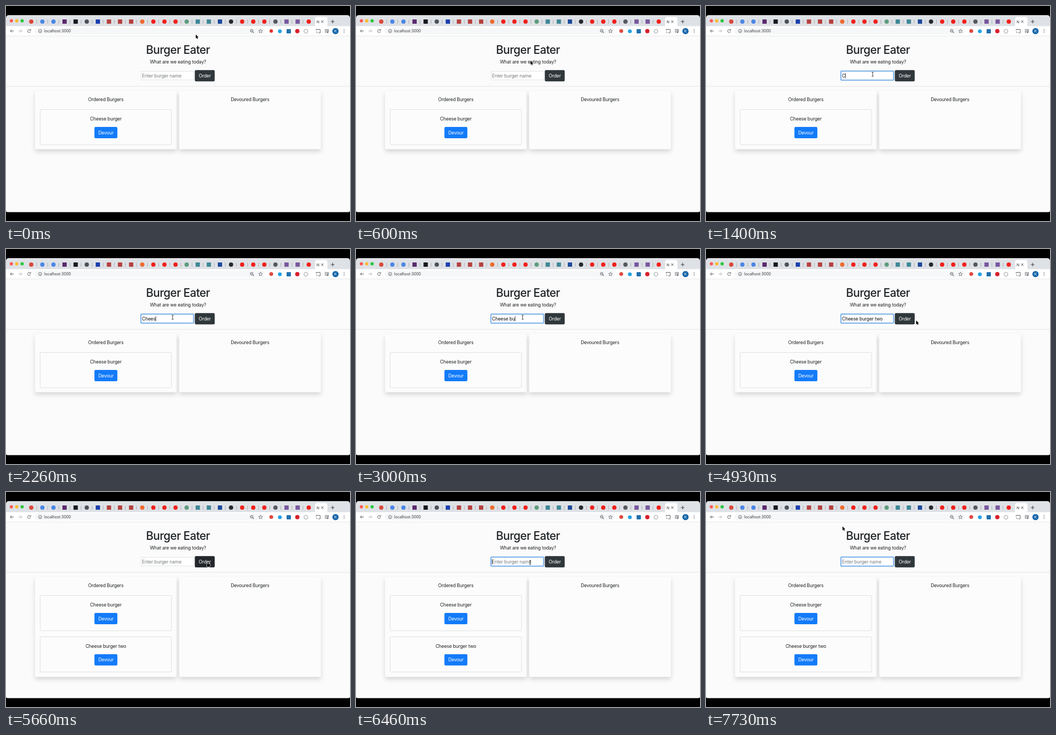
An HTML page with a canvas for the animation above (8000 ms loop, 640x400 px).

```html
<!DOCTYPE html>
<html lang="en">
<head>
<meta charset="utf-8">
<title>Burger Eater</title>
<style>
html, body { margin: 0; width: 100%; height: 100%; overflow: hidden; background: #000; }
canvas { display: block; width: 640px; height: 400px; }
</style>
</head>
<body>
<canvas id="stage" width="640" height="400"></canvas>
<script>
const ctx = document.getElementById('stage').getContext('2d');
const LOOP = 8000;
const FONT = 'Inter, Roboto, sans-serif';
const INK = '#1d2124';
const GREY = '#5f6368';

// Shape helpers
function box(x, y, w, h, fill, r = 0) {
  ctx.beginPath();
  ctx.roundRect(x, y, w, h, r);
  ctx.fillStyle = fill;
  ctx.fill();
}
function frame(x, y, w, h, color, width = 1, r = 0) {
  ctx.beginPath();
  ctx.roundRect(x, y, w, h, r);
  ctx.strokeStyle = color;
  ctx.lineWidth = width;
  ctx.stroke();
}
function dot(x, y, r, fill) {
  ctx.beginPath();
  ctx.arc(x, y, r, 0, Math.PI * 2);
  ctx.fillStyle = fill;
  ctx.fill();
}
function ring(x, y, r, color, from = 0, to = Math.PI * 2) {
  ctx.beginPath();
  ctx.arc(x, y, r, from, to);
  ctx.strokeStyle = color;
  ctx.lineWidth = 1;
  ctx.stroke();
}
function line(color, width, ...pts) {
  ctx.beginPath();
  for (let i = 0; i < pts.length; i += 2) ctx.lineTo(pts[i], pts[i + 1]);
  ctx.strokeStyle = color;
  ctx.lineWidth = width;
  ctx.stroke();
}
function text(str, x, y, { size = 8.7, weight = 400, color = INK, align = 'center', track = -0.02 } = {}) {
  ctx.font = `${weight} ${size}px ${FONT}`;
  ctx.letterSpacing = `${size * track}px`;
  ctx.textAlign = align;
  ctx.fillStyle = color;
  ctx.fillText(str, x, y);
  return ctx.measureText(str).width;
}

// Browser tabs: plain marks, 's' square or 'c' circle
const RED = 'c#f0201c', BRICK = 's#b5413f', LILAC = 's#79589f';
const TABS = [
  'c#d9483b', 'c#4a86e8', 'c#4a86e8', 's#5b2a6e', 's#17191c', 'c#4c5159', 's#1c3fae',
  BRICK, BRICK, BRICK, 'c#ee6a2c', RED, RED, RED, 'c#5d9c7c', 's#3f8796', 's#3f8796',
  's#1d4a9c', 'c#24292e', RED, RED, RED, 'c#55595e', LILAC, LILAC, RED
];
const TAB_STEP = 20.65;

function tabBar() {
  box(0, 17, 640, 24, '#dee1e5', [5, 5, 0, 0]);
  ['#fc5b57', '#fdbc2e', '#29c840'].forEach((c, i) => dot(10 + i * 10, 27.5, 3.1, c));
  TABS.forEach((tab, i) => {
    const x = 47 + i * TAB_STEP, color = tab.slice(1);
    if (tab[0] === 'c') dot(x, 29, 4, color);
    else box(x - 4, 25, 8, 8, color, 0.5);
    if (i < TABS.length - 1) line('#a0a4a9', 0.8, x + 10, 25.5, x + 10, 33);
  });
  box(575, 20.5, 23, 20, '#fff', [4, 4, 0, 0]);
  text('N', 580.5, 31.5, { size: 6.5 });
  line('#44474b', 1, 586.4, 27, 590.6, 31.2);
  line('#44474b', 1, 590.6, 27, 586.4, 31.2);
  line('#44474b', 1.1, 604.5, 29, 611, 29);
  line('#44474b', 1.1, 607.7, 25.8, 607.7, 32.2);
}

function star(x, y, r) {
  const pts = [];
  for (let i = 0; i <= 10; i++) {
    const a = i * Math.PI / 5 - Math.PI / 2, d = i % 2 ? r * 0.45 : r;
    pts.push(x + d * Math.cos(a), y + d * Math.sin(a));
  }
  line(GREY, 0.8, ...pts);
}

function toolbar(t) {
  box(0, 37.5, 640, 18.5, '#fff');
  box(53, 40, 429, 13, '#f6f7f8', 6.5);
  line(GREY, 1, 14.5, 46.5, 8, 46.5);
  line(GREY, 1, 11, 43.5, 8, 46.5, 11, 49.5);
  line('#b8bbbf', 1, 23, 46.5, 29.5, 46.5);
  line('#b8bbbf', 1, 26.5, 43.5, 29.5, 46.5, 26.5, 49.5);
  ring(43, 46.5, 2.8, GREY, 0.3, 5.4);
  line(GREY, 1, 46, 43, 46, 45.3, 43.6, 45.3);
  ring(63.5, 46.5, 3, GREY);
  line(GREY, 1, 63.5, 46, 63.5, 48.3);
  text('localhost:3000', 71, 49.2, { size: 7.2, color: '#33363a', align: 'left', track: -0.01 });

  ring(457, 46, 2.5, GREY);
  line(GREY, 1.1, 459, 48, 461.2, 50.2);
  line(GREY, 0.8, 455.8, 46, 458.2, 46);
  star(473.5, 46.7, 3.8);
  dot(493.5, 46.5, t < 600 ? 3.2 : 3.6, t < 600 ? '#e2322c' : '#df4a40');
  dot(509.5, 47, 3.6, '#24a3e5');
  box(522, 43, 8, 8, '#2472ae', 1);
  dot(542, 46.8, 4, '#d8202c');
  ring(558, 47, 3.6, '#96999d');

  line(GREY, 1, 577, 45.5, 577, 43.5, 584.5, 43.5, 584.5, 50, 581, 50);
  ring(577, 50, 2, GREY, -Math.PI / 2, 0);
  for (const y of [43.8, 46.3]) line(GREY, 1, 593, y, 599, y);
  line(GREY, 1, 593, 48.8, 596.5, 48.8);
  line(GREY, 1, 600.8, 44, 599.4, 44, 599.4, 49);
  dot(598.3, 49, 1.3, GREY);
  dot(613, 46.7, 5.8, '#1565a9');
  text('K', 613, 49.2, { size: 6.8, color: '#fff' });
  for (const y of [43.7, 46.5, 49.3]) dot(629, y, 0.8, GREY);
}

function button(x, y, w, label, fill) {
  box(x, y, w, 21, fill, 2.2);
  text(label, x + w / 2, y + 13.6, { color: '#fff' });
}

function panel(x, title, h) {
  ctx.save();
  ctx.shadowColor = 'rgba(0,0,0,.15)';
  ctx.shadowBlur = 9;
  ctx.shadowOffsetY = 4.4;
  box(x, 158, 263.5, h, '#fcfcfc', 2);
  ctx.restore();
  text(title, x + 131.7, 177.2);
}

function burger(name, y) {
  frame(63.5, y + 0.5, 244.5, 65.5, '#dfe0e1', 1, 1.5);
  text(name, 185.7, y + 21);
  button(164.5, y + 33, 42.7, 'Devour', '#137bf9');
}

// Typing: time at which each letter appears
const ORDER = 'Cheese burger two';
const KEYS = [1400, 1660, 1860, 2000, 2260, 2400, 2600, 2800, 3000, 3130, 3260, 3400, 3460, 3600, 3730, 4000, 4130];
const RELOAD = 5660;
const FOCUS = [1000, 6200];

function field(t) {
  const reloaded = t >= RELOAD;
  const start = reloaded ? FOCUS[1] : FOCUS[0];
  const focused = t >= start;
  const typed = reloaded ? '' : ORDER.slice(0, KEYS.filter(k => k <= t).length);
  box(251, 121, 98, 17, '#fff', 1);
  if (focused) {
    frame(251, 121, 98, 17, '#b3d3f5', 2.4, 1.5);
    frame(251, 121.2, 98, 16.6, '#6ba7e6', 1.3, 1);
  } else {
    frame(251.5, 121.5, 97.5, 16, '#e3e4e5', 1);
  }
  let w = 0;
  if (typed) w = text(typed, 253, 132.8, { color: '#111', align: 'left' });
  else text('Enter burger name', 253, 132.8, { color: '#777a7d', align: 'left' });

  const last = Math.max(start, ...(reloaded ? [] : KEYS.filter(k => k <= t)));
  if (focused && (t - last) % 1000 < 500) line('#111', 0.8, 253.4 + w, 125, 253.4 + w, 134.5);
}

// Pointer path: time, x, y
const PATH = [
  [0, 353, 53], [200, 353, 53], [860, 310, 127], [4260, 310, 127], [4930, 391, 133],
  [5200, 376, 131], [5700, 376, 131], [6200, 324, 131], [6860, 324, 131], [7600, 254, 64], [LOOP, 254, 64]
];
function pointer(t) {
  const i = Math.max(1, PATH.findIndex(p => t < p[0]));
  const [t0, x0, y0] = PATH[i - 1], [t1, x1, y1] = PATH[i];
  const k = (t - t0) / (t1 - t0), e = k * k * (3 - 2 * k);
  return [x0 + (x1 - x0) * e, y0 + (y1 - y0) * e];
}
const inside = (x, y, l, top, r, b) => x >= l && x <= r && y >= top && y <= b;

function drawPointer(x, y) {
  if (inside(x, y, 251, 121, 349, 138)) {
    line('#222', 0.9, x, y - 3.5, x, y + 3.5);
    for (const s of [-1, 1]) line('#222', 0.9, x - 1.7, y + s * 4, x, y + s * 3.3, x + 1.7, y + s * 4);
    return;
  }
  ctx.save();
  ctx.translate(x, y);
  ctx.beginPath();
  if (inside(x, y, 351, 119, 388, 140)) {
    ctx.roundRect(-1, -1, 1.8, 6, 0.9);
    ctx.roundRect(-2.4, 3, 6.2, 5, 1.8);
  } else {
    const pts = [0, 0, 0, 7.4, 1.7, 5.9, 2.9, 8.6, 4.1, 8.1, 2.9, 5.4, 5.2, 5.3];
    for (let i = 0; i < pts.length; i += 2) ctx.lineTo(pts[i], pts[i + 1]);
    ctx.closePath();
  }
  ctx.strokeStyle = '#fff';
  ctx.lineWidth = 1.3;
  ctx.stroke();
  ctx.fillStyle = '#000';
  ctx.fill();
  ctx.restore();
}

function draw(t) {
  const [x, y] = pointer(t);
  const reloaded = t >= RELOAD;
  box(0, 0, 640, 400, '#000');
  tabBar();
  toolbar(t);
  box(0, 56, 640, 327.5, '#fbfbfb', [0, 0, 3, 3]);
  line('#e6e7e8', 1, 0, 55.8, 640, 55.8);

  text('Burger Eater', 320, 89, { size: 21, weight: 500, track: -0.025 });
  text('What are we eating today?', 320, 107.4);
  field(t);
  const hover = inside(x, y, 351, 119, 388, 140);
  button(351.3, 119.3, 37, 'Order', hover ? '#23272b' : '#2f373b');
  line('#e5e6e7', 1, 0, 149.5, 640, 149.5);

  const h = reloaded ? 186 : 108.5;
  panel(54, 'Ordered Burgers', h);
  panel(322.3, 'Devoured Burgers', h);
  burger('Cheese burger', 192);
  if (reloaded) burger(ORDER, 268.8);
  drawPointer(x, y);
}

function tick() {
  draw(performance.now() % LOOP);
  requestAnimationFrame(tick);
}
tick();
</script>
</body>
</html>
```
